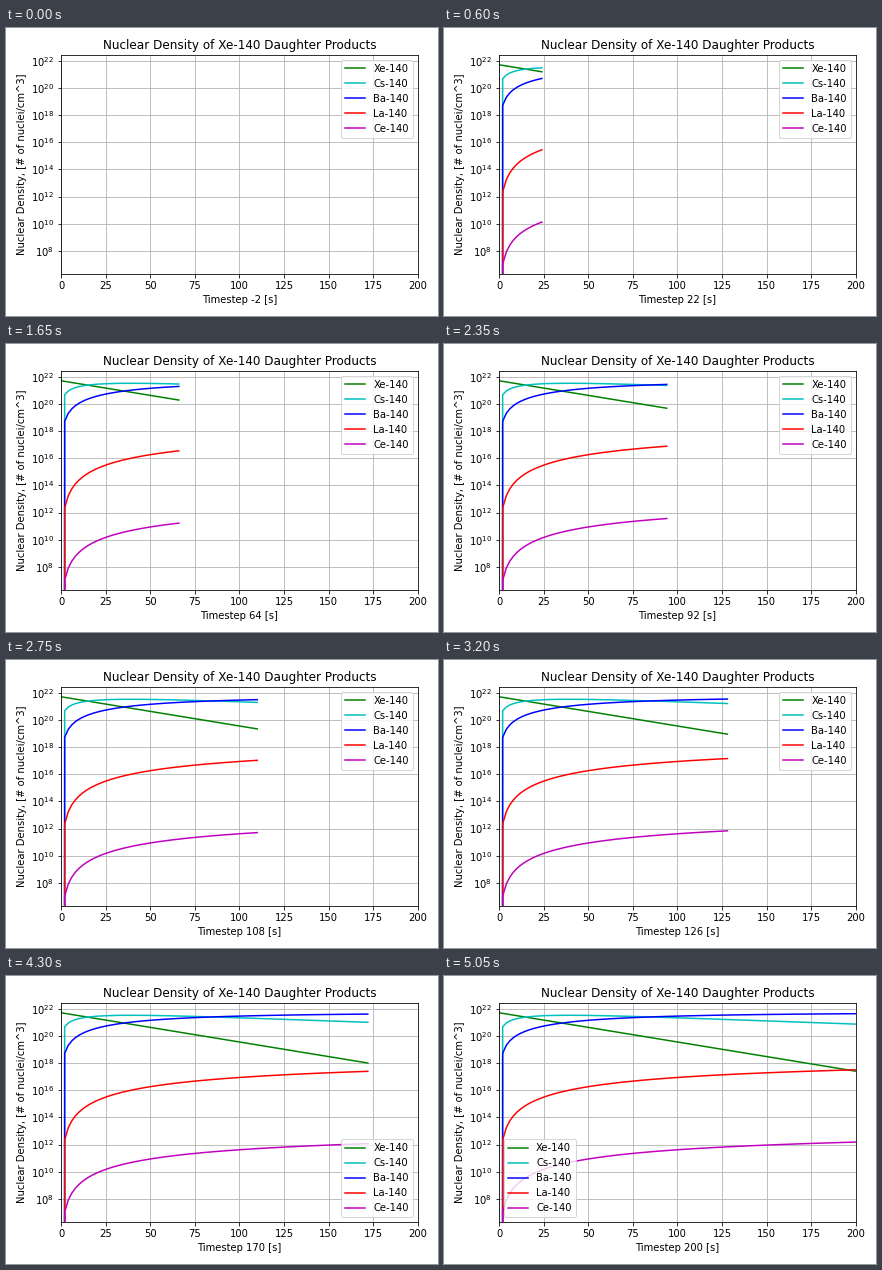
A matplotlib script for the animation above (5.1 s loop, 432x288 px).

```python
import numpy as np
import matplotlib.pyplot as plt
from matplotlib.animation import FuncAnimation

plt.rcParams["font.family"] = "DejaVu Sans"

STEP, END, FRAMES = 2, 200, 102
N0 = 5e21
HOUR, DAY = 3600, 86400
NAMES = ["Xe-140", "Cs-140", "Ba-140", "La-140", "Ce-140"]
COLORS = "gcbrm"

half_lives = np.array([14, 64, 12.75 * DAY, 40.3 * HOUR])
rates = np.log(2) / half_lives
t = np.arange(0, END + STEP, STEP)


def bateman(n):
    """Density of the n-th member of the decay chain."""
    lam = rates[:n + 1]
    total = sum(np.exp(-a * t) / np.prod([b - a for b in lam if b != a])
                for a in lam)
    density = N0 * np.prod(lam[:-1]) * total
    if n:
        density[0] = 0
    return density


chain = [bateman(n) for n in range(4)]
chain.append(rates[3] * chain[3])

fig, ax = plt.subplots(figsize=(6, 4), dpi=72)
lines = [ax.plot([], [], color=c, label=name)[0]
         for c, name in zip(COLORS, NAMES)]

low, high = np.log10([chain[4][1], N0])
pad = 0.05 * (high - low)
ax.set_yscale("log")
ax.set_xlim(0, END)
ax.set_ylim(10 ** (low - pad), 10 ** (high + pad))
ax.set_yticks(10.0 ** np.arange(8, 23, 2))
ax.minorticks_off()
ax.grid(True)
ax.set_title("Nuclear Density of Xe-140 Daughter Products")
ax.set_ylabel("Nuclear Density, [# of nuclei/cm^3]")
ax.set_xlabel("Timestep -2 [s]")
legend = ax.legend(loc="upper right")
fig.tight_layout()


def legend_spot(i):
    # keep the legend where the fewest points lie beneath it
    if i < 79:
        return "upper right"
    return "lower right" if i < 99 else "lower left"


def update(i):
    for line, density in zip(lines, chain):
        line.set_data(t[:i + 1], density[:i + 1])
    ax.set_xlabel(f"Timestep {STEP * i - 2} [s]")
    legend.set_loc(legend_spot(i))
    return lines


anim = FuncAnimation(fig, update, frames=FRAMES, interval=50,
                     repeat=True, repeat_delay=0, blit=False)
plt.show()
```
